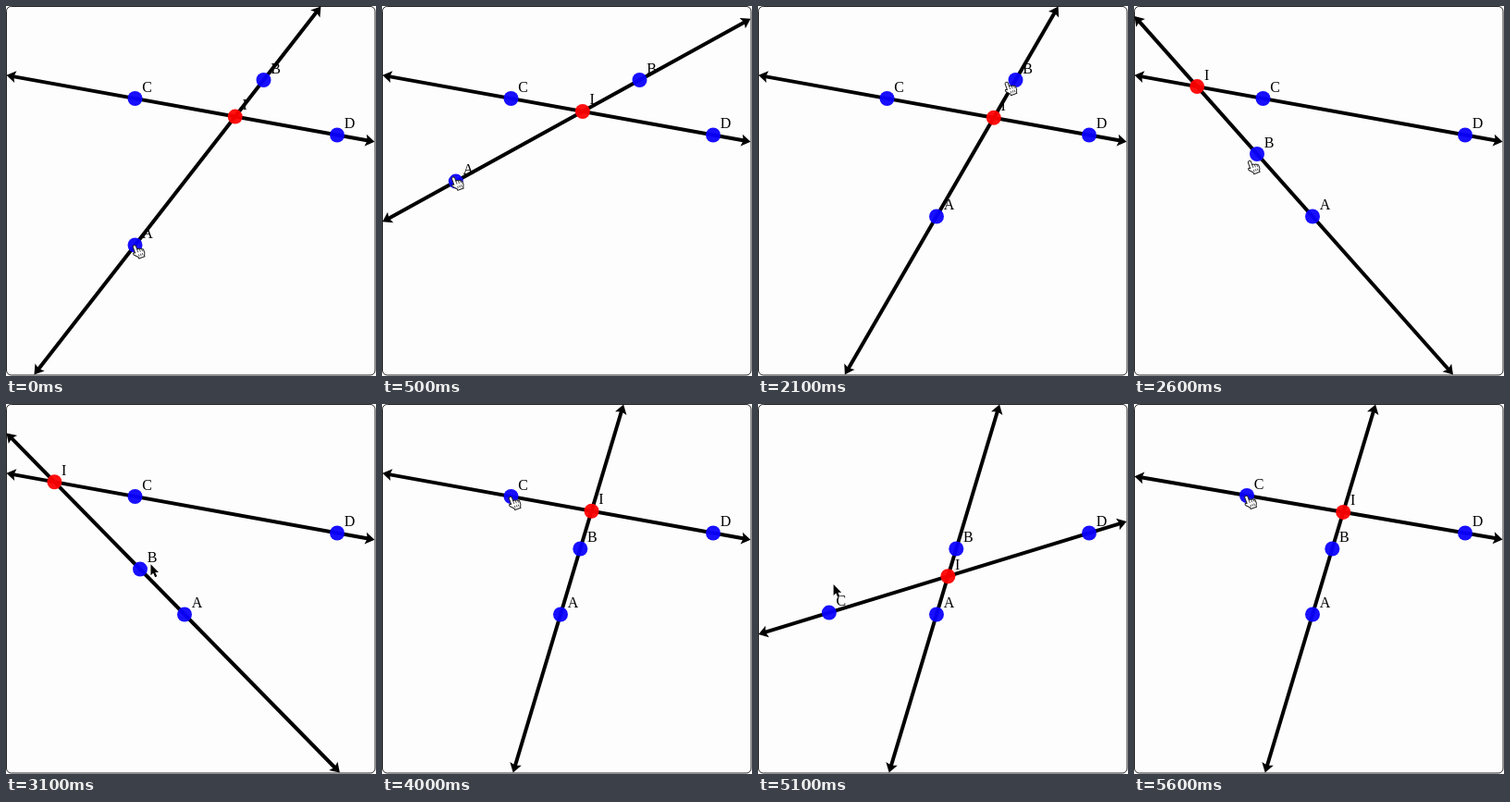
Animation of 400 by 400 pixels, one loop 5700 ms. Source, as an HTML page with a canvas:

```html
<!DOCTYPE html>
<html lang="en">
<head>
<meta charset="utf-8">
<title>Intersecting lines</title>
<style>
  html, body { margin: 0; width: 100%; height: 100%; overflow: hidden; background: #fff; }
  canvas { display: block; }
</style>
</head>
<body>
<canvas id="stage" width="400" height="400"></canvas>
<script>
const ctx = document.getElementById('stage').getContext('2d');
const LOOP = 5700, STEP = 100;
const LEAD = 50; // a dragged point trails the cursor by this many ms
const MIN = 0.5, MAX = 398.5;

const A0 = [139.5, 258.5], A1 = [193, 227.5];
const B0 = [278.5, 80], B1 = [214.3, 156.5];
const C0 = [139.5, 100], C1 = [122, 99];
const D0 = [358, 139.5];
const REST = [301, 59];

// The cursor's moves in order; a move with a name drags that point along.
const moves = [
  { name: 'A', start: 60, end: 1100, route: [A0, [86, 200], [88, 178], A1] },
  { start: 1150, end: 1300, route: [A1, REST] },
  { start: 1450, end: 2050, route: [REST, [188, 214], B0] },
  { name: 'B', start: 2100, end: 3600,
    route: [B0, [210, 100], [133, 160], [119, 181], [145, 178.6], [216, 142], B1] },
  { start: 3700, end: 4000, route: [B1, [226, 221], C0] },
  { name: 'C', start: 4100, end: 5600,
    route: [C0, [118, 165], [86, 237], [70, 268], [100, 115], C1] }
];
const rest = { A: A0, B: B0, C: C0, D: D0 };

const hand = new Path2D('M-1.7 8V1.2Q-1.5-.2 0-.2T1.6 1.2V5Q3.5 4.2 4.1 5.7' +
  'Q6 5 6.4 6.6Q8 6.3 8 8V11Q7.8 12.5 6.8 13.3V15H0V13.3L-3.8 9.2Q-4.4 7.2-2.8 7.2Z');
const fingers = new Path2D('M1.6 5V8.5M4.1 6V8.7M6.4 7V9M1.3 10.5V13M3.4 10.5V13M5.4 10.5V13');
const arrow = new Path2D('M0 0V12L2.7 9.5L4.7 14L6.8 13L4.8 8.8H8.5Z');

// Smooth curve through evenly timed route points.
function follow({ start, end, route }, t) {
  const last = route.length - 1;
  const s = Math.min(Math.max((t - start) / (end - start), 0), 1) * last;
  const i = Math.min(Math.floor(s), last - 1), u = s - i;
  const [x, y] = [0, 1].map(k => {
    const [a, b, c, d] = [-1, 0, 1, 2].map(j => route[Math.min(Math.max(i + j, 0), last)][k]);
    return b + u / 2 * (c - a + u * (2 * a - 5 * b + 4 * c - d + u * (3 * (b - c) + d - a)));
  });
  return { x, y };
}

function pointAt(name, t) {
  const drag = moves.find(m => m.name === name);
  return drag ? follow(drag, t) : { x: rest[name][0], y: rest[name][1] };
}

function cursorAt(t) {
  const p = follow(moves.findLast(m => m.start <= t) || moves[0], t);
  return { x: p.x - 1, y: p.y + 0.5 };
}

function intersect(a, b, c, d) {
  const ux = b.x - a.x, uy = b.y - a.y, vx = d.x - c.x, vy = d.y - c.y;
  const s = ((c.x - a.x) * vy - (c.y - a.y) * vx) / (ux * vy - uy * vx);
  return { x: a.x + ux * s, y: a.y + uy * s };
}

function arrowHead(x, y, angle) {
  ctx.save();
  ctx.translate(x, y);
  ctx.rotate(angle);
  ctx.beginPath();
  ctx.moveTo(0, 0);
  ctx.lineTo(-10, 6.5);
  ctx.lineTo(-8, 0);
  ctx.lineTo(-10, -6.5);
  ctx.fill();
  ctx.restore();
}

// Extends the line through p and q to the stage edges.
function drawLine(p, q) {
  const angle = Math.atan2(q.y - p.y, q.x - p.x);
  const ux = Math.cos(angle), uy = Math.sin(angle);
  let lo = -Infinity, hi = Infinity;
  for (const [pos, dir] of [[p.x, ux], [p.y, uy]]) {
    if (Math.abs(dir) < 1e-9) continue;
    const s = (MIN - pos) / dir, e = (MAX - pos) / dir;
    lo = Math.max(lo, Math.min(s, e));
    hi = Math.min(hi, Math.max(s, e));
  }
  const along = s => [p.x + ux * s, p.y + uy * s];
  ctx.lineWidth = 4;
  ctx.strokeStyle = ctx.fillStyle = '#000';
  ctx.beginPath();
  ctx.moveTo(...along(lo + 7));
  ctx.lineTo(...along(hi - 7));
  ctx.stroke();
  arrowHead(...along(hi), angle);
  arrowHead(...along(lo), angle + Math.PI);
}

function drawPoint(name, p, color) {
  ctx.globalAlpha = 0.94;
  ctx.fillStyle = color;
  ctx.beginPath();
  ctx.arc(p.x, p.y, 8, 0, Math.PI * 2);
  ctx.fill();
  ctx.globalAlpha = 1;
  ctx.fillStyle = '#000';
  ctx.fillText(name, p.x + 7.7, p.y - 7.5);
}

// A hand over a point, an arrow elsewhere.
function drawCursor(c, points) {
  const over = points.some(p => Math.hypot(p.x - c.x, p.y - c.y) < 12);
  ctx.save();
  ctx.translate(c.x, c.y);
  ctx.lineWidth = 1;
  ctx.lineJoin = 'round';
  if (over) {
    ctx.rotate(-0.35);
    ctx.fillStyle = '#fff';
    ctx.strokeStyle = '#222';
    ctx.fill(hand);
    ctx.stroke(hand);
    ctx.lineWidth = 0.7;
    ctx.stroke(fingers);
  } else {
    ctx.fillStyle = '#000';
    ctx.strokeStyle = '#fff';
    ctx.stroke(arrow);
    ctx.fill(arrow);
  }
  ctx.restore();
}

function draw(t) {
  ctx.clearRect(0, 0, 400, 400);
  ctx.beginPath();
  ctx.roundRect(0.5, 0.5, 398.5, 398.5, 5);
  ctx.fillStyle = '#fdfdfd';
  ctx.fill();
  ctx.lineWidth = 1;
  ctx.strokeStyle = '#222';
  ctx.stroke();

  const names = Object.keys(rest);
  const points = names.map(n => pointAt(n, t));
  const [a, b, c, d] = points;
  drawLine(a, b);
  drawLine(c, d);
  ctx.font = '16px "Liberation Serif", Times, serif';
  names.forEach((n, i) => drawPoint(n, points[i], '#0a00ff'));
  drawPoint('I', intersect(a, b, c, d), '#ff0000');
  drawCursor(cursorAt(t + LEAD), points);
}

function tick() {
  draw(Math.floor(performance.now() / STEP) * STEP % LOOP);
  requestAnimationFrame(tick);
}
tick();
</script>
</body>
</html>
```
